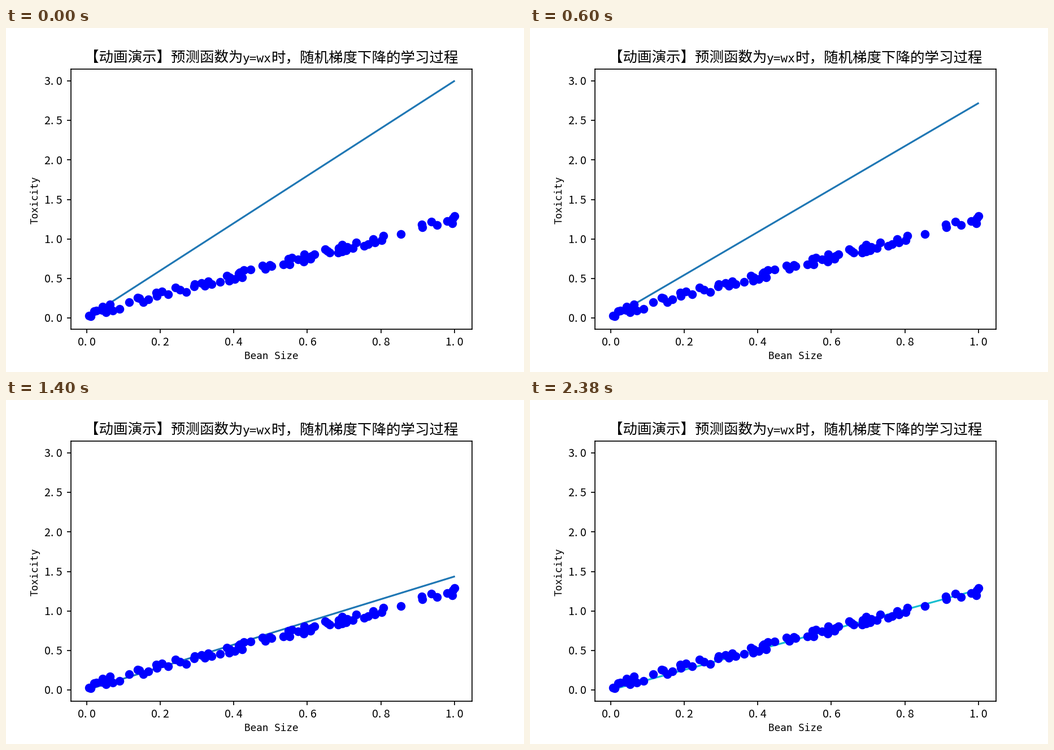
Recreate the animation shown at these times as a matplotlib script. Size 917 by 611 pixels, loop 2400 ms.

```python
import numpy as np
import matplotlib.pyplot as plt
from matplotlib.animation import FuncAnimation

W, H = 917, 611
FRAMES, STEP_MS = 120, 20
X0, Y0 = 142.9, 515             # stage position of the data zero
X_UNIT, Y_UNIT = 651, 140.34    # pixels per data unit
SLOPE, LIFT = 1.2, 0.05         # trend of the beans
CJK, MONO = "Noto Sans CJK JP", "DejaVu Sans Mono"

# Pixels above the trend -> stage x of the beans at that height
BEANS = {
    6: [171, 184, 233, 266, 276, 300, 421, 454, 500, 506, 528, 565, 595,
        736, 753, 794],
    3.5: [236, 334, 391, 414, 433, 467, 620, 668],
    2: [156, 160, 218, 346, 358, 412, 546, 569, 589, 650, 791],
    0: [170, 267, 308, 333, 396, 470, 517, 541, 604, 737, 781],
    -2.2: [183, 252, 287, 459, 491, 573, 699, 763],
    -4.5: [147, 243, 352, 364, 379, 502, 539, 614, 641, 653, 665],
    -6.2: [150, 177, 189, 201, 319, 395, 405, 418, 527, 588, 595, 602,
           634, 790],
}


def trend(x):
    return SLOPE * x + LIFT


def learn_slopes(count, w=3.0, rate=0.1):
    """Slope before each step of gradient descent over the sorted beans."""
    rank = [0, 8, 14, 29, 44, 60, 78, 99]
    size = [0.006, 0.06, 0.145, 0.32, 0.46, 0.615, 0.73, 0.999]
    slopes = []
    for k in range(count):
        slopes.append(w)
        x = np.interp(k % 100, rank, size)
        w -= rate * 2 * x * (w * x - trend(x))
    return slopes


# At 72 dpi one point is one pixel
fig = plt.figure(figsize=(W / 72, H / 72), dpi=72, facecolor="white")
ax = fig.add_axes([0.125, 0.125, 0.775, 0.755])
ax.set_xlim(-0.0434, 1.0483)
ax.set_ylim(-0.1395, 3.1475)
ax.set_xticks(np.arange(6) * 0.2)
ax.set_yticks(np.arange(7) * 0.5)
ax.tick_params(length=7.4, width=1.7, labelbottom=False, labelleft=False)
for spine in ax.spines.values():
    spine.set_linewidth(1.7)


def label(x, y, text, size, font, ha="center", rotation=0):
    fig.text(x / W, 1 - y / H, text, fontsize=size, family=font, ha=ha,
             va="baseline", rotation=rotation, rotation_mode="anchor")


def tick_label(x, y, value, ha="center"):
    label(x, y, f"{value:.1f}".replace(".", ". "), 19.7, CJK, ha)


for v in ax.get_xticks():
    tick_label(X0 + v * X_UNIT, 564.5, v)
for v in ax.get_yticks():
    tick_label(100, Y0 - v * Y_UNIT + 7.3, v, "right")

label(470, 588.5, "Bean Size", 17.6, MONO)
label(57, 305, "Toxicity", 17.6, MONO, rotation=90)

label(139, 61, "【动画演示】预测函数为", 25.47, CJK, "left")
label(419, 61, "y=wx", 21.15, MONO, "left")
label(470, 61, "时，随机梯度下降的学习过程", 25.47, CJK, "left")

for rise, columns in BEANS.items():
    x = (np.array(columns) - X0) / X_UNIT
    ax.scatter(x, trend(x) + rise / Y_UNIT, s=156, c="b", linewidths=3,
               zorder=2)

ends = np.array([0.006, 0.999])
line, = ax.plot(ends, 3 * ends, lw=3.18, zorder=1)
slopes = learn_slopes(FRAMES)


def draw(k):
    line.set_ydata(slopes[k] * ends)
    line.set_color(f"C{k % 10}")
    return line,


anim = FuncAnimation(fig, draw, frames=FRAMES, interval=STEP_MS,
                     init_func=lambda: draw(0), repeat=True, repeat_delay=0)
plt.show()
```
